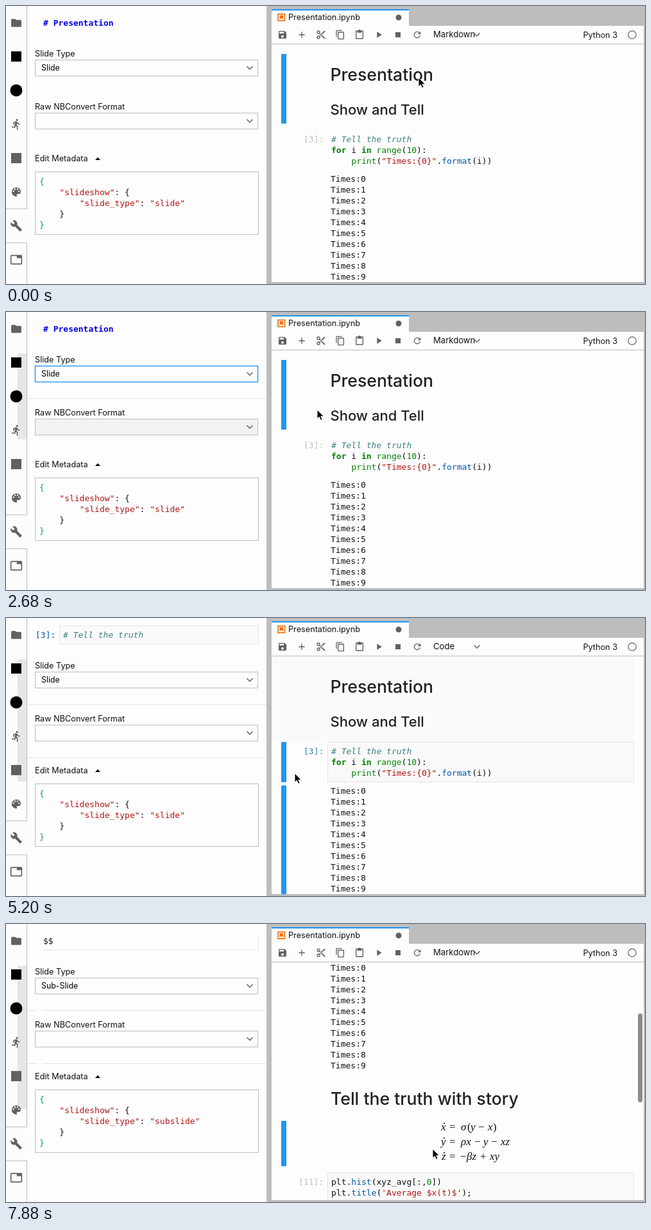
An HTML page for the animation above (8 s loop, 996 by 435 pixels).

```html
<!DOCTYPE html>
<html lang="en">
<head>
<meta charset="utf-8">
<title>Notebook slide settings</title>
<style>
html, body { margin: 0; width: 100%; height: 100%; overflow: hidden; background: #fdfdfd; }
svg { display: block; width: 996px; height: 435px; }
text { white-space: pre; font-optical-sizing: none; fill: #111; }
.ui { font: 12.7px Inter, sans-serif; }
.pick { font: 12.4px Inter, sans-serif; fill: #000; }
.item { font: 13px "Liberation Sans", Arial, sans-serif; fill: #222; }
.code { font: 13px "DejaVu Sans Mono", monospace; }
.h1 { font: 500 26.6px Inter, sans-serif; fill: #212121; }
.h2 { font: 500 22px Inter, sans-serif; fill: #212121; }
.math { font: 17px "Liberation Serif", serif; }
.math .v { font-style: italic; }
.kw { fill: #008000; font-weight: bold; }
.fn { fill: #008000; }
.str { fill: #b01515; }
.prop { fill: #0055aa; }
.com { fill: #408080; font-style: italic; }
.head { fill: #0000e6; font-weight: bold; }
.brace { fill: #00a650; }
.line { fill: none; stroke: #bdbdbd; }
.soft { fill: none; stroke: #e4e4e4; }
.chev { fill: none; stroke: #616161; stroke-width: 1.5; }
.icon { fill: #616161; }
</style>
</head>
<body>
<svg id="stage" viewBox="0 0 996 435"></svg>
<script>
const stage = document.getElementById('stage');
const LOOP = 8000, BLUE = '#2196f3', PAPER = '#fdfdfd';

// Markup helpers
const rect = (x, y, w, h, fill, extra = '') =>
  `<rect x="${x}" y="${y}" width="${w}" height="${h}" fill="${fill}" ${extra}/>`;
const frame = (x, y, w, h, cls = 'line', extra = '') =>
  `<rect x="${x + .5}" y="${y + .5}" width="${w}" height="${h}" class="${cls}" ${extra}/>`;
const path = (d, cls, extra = '') => `<path d="${d}" class="${cls}" ${extra}/>`;
const text = (x, y, cls, body, extra = '') =>
  `<text x="${x}" y="${y}" class="${cls}" ${extra}>${body}</text>`;
const span = (cls, body) => `<tspan class="${cls}">${body}</tspan>`;
const group = (id, body, extra = '') => `<g id="${id}" ${extra}>${body}</g>`;
const icon = (cx, cy, size, body) =>
  `<g class="icon" transform="translate(${cx - size / 2} ${cy - size / 2}) scale(${size / 24})">${body}</g>`;
const glyph = d => `<path d="${d}"/>`;
const chevron = (x, y) => path(`M${x - 4.5} ${y - 2}l4.5 4.5 4.5-4.5`, 'chev');

const holes = [[6.5, 10.5], [9.5, 6.5], [14.5, 6.5], [17.5, 10.5]]
  .map(([x, y]) => `<circle cx="${x}" cy="${y}" r="1.5" fill="${PAPER}"/>`).join('');
const icons = {
  folder: glyph('M10 4H4a2 2 0 0 0-2 2v12a2 2 0 0 0 2 2h16a2 2 0 0 0 2-2V8a2 2 0 0 0-2-2h-8z'),
  run: '<circle cx="13.5" cy="3.5" r="2"/>' + glyph('M9.9 19.4l1-4.4 2.1 2v6h2v-7.5l-2.1-2 .6-3c1.3 1.5 3.3 2.5 5.5 2.5v-2c-1.9 0-3.5-1-4.3-2.4l-1-1.6c-.4-.6-1-1-1.7-1l-.8.1L6 8.3V13h2V9.6l1.8-.7L8.2 17l-4.9-1-.4 2z'),
  palette: glyph('M12 3a9 9 0 0 0 0 18c.8 0 1.5-.7 1.5-1.5 0-.9-.8-1.1-.8-2s.7-1.5 1.5-1.5H16a5 5 0 0 0 5-5c0-4.4-4-8-9-8z') + holes,
  wrench: glyph('M22.7 19l-9.1-9.1c.9-2.3.4-5-1.5-6.9-2-2-5-2.4-7.4-1.3L9 6 6 9 1.6 4.7C.4 7.1.9 10.1 2.9 12.1c1.9 1.9 4.6 2.4 6.9 1.5l9.1 9.1c.4.4 1 .4 1.4 0l2.3-2.3c.5-.4.5-1.1.1-1.4z'),
  tab: glyph('M21 3H3a2 2 0 0 0-2 2v14a2 2 0 0 0 2 2h18a2 2 0 0 0 2-2V5a2 2 0 0 0-2-2zm0 16H3V5h10v4h8z'),
  save: glyph('M17 3H5a2 2 0 0 0-2 2v14a2 2 0 0 0 2 2h14a2 2 0 0 0 2-2V7zm-5 16a3 3 0 1 1 0-6 3 3 0 0 1 0 6zm3-10H5V5h10z'),
  add: glyph('M19 13h-6v6h-2v-6H5v-2h6V5h2v6h6z'),
  cut: '<g fill="none" stroke="#616161" stroke-width="2"><circle cx="6" cy="6" r="3"/><circle cx="6" cy="18" r="3"/></g>' +
    glyph('M8 9.3l1.4-1.6L22 20v1h-3zM8 14.7l1.4 1.6L22 4V3h-3z'),
  copy: glyph('M16 1H4a2 2 0 0 0-2 2v14h2V3h12zm3 4H8a2 2 0 0 0-2 2v14a2 2 0 0 0 2 2h11a2 2 0 0 0 2-2V7a2 2 0 0 0-2-2zm0 16H8V7h11z'),
  paste: glyph('M19 2h-4.2a3 3 0 0 0-5.6 0H5a2 2 0 0 0-2 2v16a2 2 0 0 0 2 2h14a2 2 0 0 0 2-2V4a2 2 0 0 0-2-2zm0 18H5V4h2v3h10V4h2z'),
  play: glyph('M8 5v14l11-7z'),
  stop: glyph('M6 6h12v12H6z'),
  reload: glyph('M17.7 6.4A8 8 0 1 0 19.7 14h-2.1A6 6 0 1 1 16.2 7.8L13 11h7V4z')
};

function sidebar() {
  return rect(0, 0, 32, 435, '#fcfcfc') +
    group('ghost', rect(18, 65, 14, 1, '#e6e6e6', 'id="ghostBar"')) +
    path('M32.5 0V317.5H0M0 370.5H32.5V435', 'line') +
    icon(16, 26.5, 19, icons.folder) +
    rect(8, 71, 16, 16, '#000') +
    '<circle cx="16" cy="132" r="9.5"/>' +
    icon(16, 185, 19, icons.run) +
    rect(8, 230, 16, 16, '#616161') +
    icon(16, 291, 19, icons.palette) +
    icon(16, 344, 19, icons.wrench) +
    icon(16, 397, 20, icons.tab);
}

function settings() {
  const json = (y, body) => text(52, y, 'code', body);
  return group('headMd', text(58, 31, 'code head', '')) +
    group('headCode', frame(83, 12, 310, 28, 'soft', 'style="fill:#fafafa"') +
      text(46, 31, 'code prop', '[3]:') + text(89, 31, 'code com', '# Tell the truth')) +
    group('headMath', path('M57 40.5H393.5V20', 'soft') + text(58, 31, 'code', '$$')) +
    path('', 'soft', 'id="rules"') +
    text(45, 79, 'ui', 'Slide Type') +
    frame(45, 84, 347, 25, 'line', 'id="typeBox"') +
    text(55, 101, 'pick', 'Slide', 'id="typeValue"') + chevron(380, 96.5) +
    text(45, 162, 'ui', 'Raw NBConvert Format') +
    frame(45, 167, 347, 25, 'line', 'id="rawBox"') + chevron(380, 179.5) +
    text(45, 243, 'ui', 'Edit Metadata') + '<path d="M139 241l4-4.2 4 4.2z"/>' +
    frame(45, 259, 348, 98) +
    json(278.5, span('brace', '{')) +
    json(296, '    ' + span('str', '"slideshow"') + ': {') +
    json(313, '        ' + span('str', '"slide_type"') + ': ' + '<tspan class="str" id="jsonValue"></tspan>') +
    json(330, '    }') +
    json(347, span('brace', '}'));
}

function equation(y, dotX, parts) {
  return parts.map(([x, s, cls = '']) => text(x, y, '', `<tspan class="${cls}">${s}</tspan>`)).join('') +
    `<circle cx="${dotX}" cy="${y - 11}" r="1"/>`;
}

function notebook() {
  const line = (y, body, x = 507) => text(x, y, 'code', body);
  const outputs = Array.from({ length: 10 }, (_, i) => line(275 + 17 * i, 'Times:' + i, 506)).join('');
  const math = `<g class="math">` +
    equation(525, 683, [[678, 'x', 'v'], [691, '='], [709, 'σ', 'v'], [719, '('], [724, 'y', 'v'], [736, '−'], [751, 'x', 'v'], [759, ')']]) +
    equation(548, 683, [[678, 'y', 'v'], [691, '='], [709, 'ρx', 'v'], [730, '−'], [744, 'y', 'v'], [756, '−'], [771, 'xz', 'v']]) +
    equation(571, 683, [[679, 'z', 'v'], [691, '='], [708, '−'], [718, 'βz', 'v'], [739, '+'], [754, 'xy', 'v']]) + '</g>';
  return rect(414, 60, 565, 134, '#fafafa', 'id="shade"') +
    text(505.5, 117, 'h1', 'Presentation') +
    text(505.5, 170, 'h2', 'Show and Tell') +
    frame(501, 194, 477, 62, 'soft', 'id="codeBox" style="fill:#f9f9f9"') +
    text(464, 213, 'code', '[3]:', 'id="prompt"') +
    line(213, span('com', '# Tell the truth')) +
    line(230, `${span('kw', 'for')} i ${span('kw', 'in')} ${span('fn', 'range')}(${span('fn', '10')}):`) +
    line(247, `    ${span('fn', 'print')}(${span('str', '"Times:{0}"')}.${span('prop', 'format')}(i))`) +
    outputs +
    text(506, 485, 'h1', 'Tell the truth with story') + math +
    frame(501, 591, 477, 70, 'soft', 'style="fill:#f9f9f9"') +
    text(456, 610, 'code', '[11]:', 'style="fill:#bdbdbd"') +
    line(610, `plt.${span('prop', 'hist')}(xyz_avg[:,${span('fn', '0')}])`) +
    line(627, `plt.${span('prop', 'title')}(${span('str', "'Average $x(t)$'")});`) +
    rect(429, 0, 8, 0, BLUE, 'id="barA" rx="1"') + rect(429, 0, 8, 0, BLUE, 'id="barB" rx="1"');
}

function chrome() {
  const tools = ['save', 'add', 'cut', 'copy', 'paste', 'play', 'stop', 'reload'];
  return rect(414, 5, 214, 27, PAPER) + rect(414, 5, 214, 2, BLUE) +
    '<rect x="424" y="12.5" width="10.5" height="10.5" fill="#fff" stroke="#ef6c00" stroke-width="1.6"/>' +
    '<path d="M426.5 14.5h5.5v6.5l-2.75-2.5-2.75 2.5z" fill="#ef6c00"/>' +
    text(440, 21.5, 'ui', 'Presentation.ipynb') +
    '<circle cx="612" cy="18" r="4.5" class="icon"/>' +
    tools.map((name, i) => icon(431 + 30 * i, 45, 16, icons[name])).join('') +
    text(666, 49, 'ui', '', 'id="cellType" style="font-size:13.1px"') + chevron(734, 44.5) +
    text(953, 49.5, 'ui', 'Python 3', 'text-anchor="end"') +
    '<circle cx="976" cy="45" r="6.2" fill="none" stroke="#616161" stroke-width="1.2"/>' +
    path('M414 59.5H994', 'line');
}

function menu() {
  const items = ['-', 'Slide', 'Sub-Slide', 'Fragment', 'Skip', 'Notes'];
  return rect(33, 66, 347, 123, '#eee', 'id="menuBack" rx="5" stroke="#c4c4c4" stroke-width=".6" filter="url(#drop)"') +
    rect(33, 90, 347, 19, '#3f98fd') +
    path('M39.5 99.5l2.5 3.5 4.5-8.5', '', 'fill="none" stroke="#fff" stroke-width="1.6"') +
    items.map((s, i) => text(54, 85 + 19 * i, 'item', s, i === 1 ? 'style="fill:#fff"' : '')).join('');
}

stage.innerHTML = `<defs>
  <clipPath id="page"><rect x="414" y="60" width="580" height="372"/></clipPath>
  <filter id="drop" x="-10%" y="-20%" width="120%" height="150%">
    <feDropShadow dx="0" dy="4" stdDeviation="4" flood-opacity=".25"/></filter></defs>` +
  rect(0, 0, 996, 435, PAPER) + sidebar() + settings() +
  rect(406, 0, 590, 435, '#bdbdbd') + rect(414, 31, 580, 401, PAPER) +
  `<g clip-path="url(#page)">${group('doc', notebook())}</g>` + chrome() +
  rect(985, 0, 7, 139, '#8c8c8c', 'id="thumb" rx="3.5"') +
  group('menu', menu()) +
  group('cursor', '<path d="M0 0V14.2l3.3-3 2.3 5.2 2.5-1.1-2.3-5H10.3z" fill="#000" stroke="#fff" stroke-width="1"/>');

// Stepped tracks: each row is [start time, ...values]
const pointer = [
  [0, 643, 112], [150, 638, 125], [300, 634, 134],
  [1200, 590, 130], [1350, 460, 114], [1490, 335, 101], [1640, 301, 96],
  [2530, 385, 122], [2680, 485, 153], [2830, 605, 174], [2980, 664, 178],
  [3270, 655, 196], [3420, 642, 214], [3720, 610, 210], [3860, 510, 176],
  [4010, 385, 136], [4160, 300, 112], [4310, 280, 106],
  [5060, 345, 160], [5200, 450, 243], [5350, 495, 271],
  [6250, 505, 290], [6390, 527, 315], [6540, 540, 327], [6690, 542, 331],
  [7140, 543, 332], [7440, 570, 342], [7580, 620, 349], [7730, 658, 352], [7880, 665, 352]
];
const scrolls = [[0, 0], [5800, 48], [5950, 129], [6100, 133], [7290, 152], [7440, 188], [7580, 202]];
const ghosts = [[0, 0], [1640, 134], [4310, 191], [5350, 224]];
const cells = [
  [0, 'title'], [3570, 'code'], [6540, 'story'], [7730, 'math']
];
const bars = { title: [75, 184], code: [194, 257, 262, 432], story: [442, 500], math: [510, 581] };
const heads = { title: '# Presentation', story: '# Tell the truth with story' };

const at = (track, t) => track.filter(row => row[0] <= t).pop().slice(1);
const within = (t, a, b) => t >= a && t < b;
const $ = Object.fromEntries([...stage.querySelectorAll('[id]')].map(el => [el.id, el]));
const show = (el, on) => el.setAttribute('visibility', on ? 'visible' : 'hidden');
const set = (el, attrs) => { for (const k in attrs) el.setAttribute(k, attrs[k]); };
const mdText = $.headMd.firstChild;

function ruleLines(t, cell) {
  if (t < 1640) return '';
  const rule = y => cell === 'story' ? `M33 ${y}H48`
    : cell === 'math' ? `M33 ${y}H48M57 ${y}H406` : `M33 ${y}H406`;
  return rule(135.5) + (t >= 3570 ? rule(218.5) : '');
}

function draw(t) {
  const [x, y] = at(pointer, t), [scroll] = at(scrolls, t), [ghost] = at(ghosts, t), [cell] = at(cells, t);
  const isCode = cell === 'code', focus = within(t, 1640, 3570);

  set($.cursor, { transform: `translate(${x} ${y})` });
  set($.doc, { transform: `translate(0 ${-scroll})` });
  set($.ghostBar, { height: ghost });
  set($.rules, { d: ruleLines(t, cell) });

  const [a, b, c = 0, d = 0] = bars[cell];
  set($.barA, { y: a, height: b - a });
  set($.barB, { y: c, height: d - c });

  show($.shade, isCode && t < 5800);
  show($.codeBox, isCode);
  $.prompt.style.fill = isCode ? '#307fc1' : '#bdbdbd';
  $.cellType.textContent = isCode ? 'Code' : 'Markdown';

  show($.headMd, cell in heads);
  mdText.textContent = heads[cell] || '';
  show($.headCode, isCode);
  show($.headMath, cell === 'math');

  const sub = cell === 'math';
  $.typeValue.textContent = sub ? 'Sub-Slide' : 'Slide';
  $.jsonValue.textContent = sub ? '"subslide"' : '"slide"';
  $.typeBox.style.stroke = focus ? BLUE : '';
  $.typeBox.style.strokeWidth = focus ? 1.4 : 1;
  $.rawBox.style.fill = within(t, 1640, 4910) ? '#f2f2f2' : 'none';

  show($.menu, within(t, 1640, 2390) || within(t, 4310, 4910));
  set($.menuBack, { fill: t < 3000 ? '#eeeeee' : '#fafafa' });

  show($.thumb, within(t, 5800, 6690) || t >= 7290);
  set($.thumb, { y: 62.5 + scroll * .3836 });
}

const start = performance.now();
function tick() {
  draw((performance.now() - start) % LOOP);
  requestAnimationFrame(tick);
}
draw(0);
requestAnimationFrame(tick);
</script>
</body>
</html>
```
